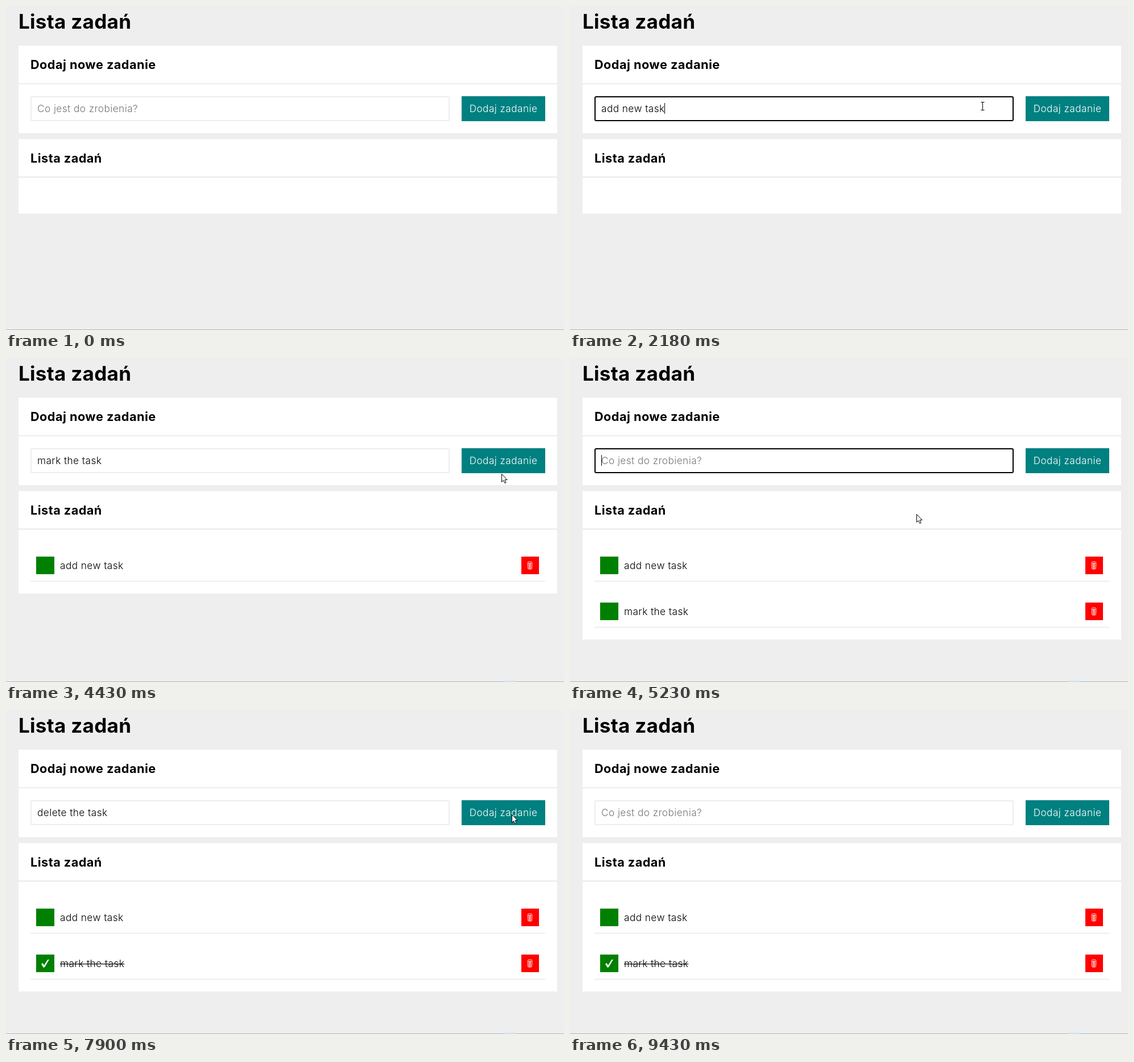
Recreate the animation shown at these times as an HTML page with a canvas. Size 981 by 571 pixels, loop 9.96 s.

```html
<!DOCTYPE html>
<html lang="pl">
<head>
<meta charset="utf-8">
<title>Lista zadań</title>
<style>
  html, body { margin: 0; width: 100%; height: 100%; overflow: hidden; background: #eee; }
  canvas { display: block; width: 981px; height: 571px; }
</style>
</head>
<body>
<canvas id="stage" width="981" height="571"></canvas>
<script>
const ctx = document.getElementById('stage').getContext('2d');
const LOOP = 9960;
const FAMILY = 'Inter, "Open Sans", sans-serif';
const STYLES = {
  title: { font: `700 35px ${FAMILY}`, spacing: '0.3px' },
  head: { font: `700 21.6px ${FAMILY}`, spacing: '0.5px' },
  body: { font: `300 17.2px ${FAMILY}`, spacing: '0.45px' }
};
const ROW = 81;
const FIRST_FOCUS = 950, CHECKED = 5890, REMOVED = 9230;

// Each round begins when the previous task is added
const ROUNDS = [
  { task: 'add new task', typed: 1720, blur: 2780, add: 2840 },
  { task: 'mark the task', typed: 3640, blur: 3840, add: 4830 },
  { task: 'delete the task', typed: 7290, blur: 5820, add: 8030 },
  { task: '', typed: Infinity, blur: 9100, add: Infinity }
];

// Pointer glides: start, end, from, to; it rests at the end until the next one
const FIELD = [725, 176], BUTTON = [843, 192], CHECK = [64, 454], TRASH = [916, 528];
const LOW = [793, 525], ADD = [871, 204], PRESS = [889, 184];
const GLIDES = [
  [120, 990, [925, 449], FIELD],
  [2180, 2450, FIELD, BUTTON],
  [3110, 3310, BUTTON, LOW],
  [3310, 3640, LOW, [872, 575]],
  [3840, 4430, [882, 575], ADD],
  [4430, 4600, ADD, [868, 190]],
  [5030, 5560, [868, 190], CHECK],
  [6090, 6220, CHECK, [290, 632]],
  [7700, 7900, [947, 575], PRESS],
  [8170, 8770, PRESS, TRASH],
  [9370, 9430, TRASH, [985, 575]]
];

function rect(x, y, w, h, color) {
  ctx.fillStyle = color;
  ctx.fillRect(x, y, w, h);
}

function text(str, x, y, style, color = '#000', align = 'left') {
  ctx.font = STYLES[style].font;
  ctx.letterSpacing = STYLES[style].spacing;
  ctx.textAlign = align;
  ctx.fillStyle = color;
  ctx.fillText(str, x, y);
  return ctx.measureText(str).width;
}

function fillPolygon(points) {
  ctx.beginPath();
  points.forEach(([x, y]) => ctx.lineTo(x, y));
  ctx.closePath();
  ctx.fillStyle = '#fff';
  ctx.fill();
}

function at(x, y, paint) {
  ctx.save();
  ctx.translate(x, y);
  ctx.lineWidth = 1;
  paint();
  ctx.restore();
}

function card(y, heading, bottom) {
  rect(22, y, 947, bottom - y, '#fff');
  rect(22, y + 65.7, 947, 2.5, '#eee');
  text(heading, 43, y + 41, 'head');
}

function input(value, focus, caretAge) {
  ctx.lineWidth = 2;
  ctx.strokeStyle = focus ? '#000' : '#eee';
  ctx.beginPath();
  ctx.roundRect(44, 160, 735, 42, focus ? 2 : 0);
  ctx.stroke();
  const width = text(value || 'Co jest do zrobienia?', 55, 187, 'body', value ? '#000' : '#757575');
  const lit = Math.floor(caretAge / 500) % 2 === 0;
  if (focus && lit) rect(Math.floor(55 + (value ? width : 0)), 171, 1, 19, '#000');
}

function trash() {
  ctx.strokeStyle = '#ffe4dc';
  ctx.beginPath();
  ctx.ellipse(0, -5, 4, 1.6, 0, 0, Math.PI * 2);
  for (const x of [-4, -1.5, 0, 1.5, 4]) {
    ctx.moveTo(x, -4);
    ctx.lineTo(x * 0.8, 6);
  }
  ctx.moveTo(-3.2, 6);
  ctx.quadraticCurveTo(0, 7.6, 3.2, 6);
  ctx.stroke();
}

function task(i, done) {
  const y = 350 + i * ROW;
  rect(53, y, 32, 31, 'green');
  rect(906, y, 31, 31, 'red');
  at(921, y + 15.5, trash);
  rect(43, y + 42.5, 905, 2, '#eee');
  const width = text(ROUNDS[i].task, 95, y + 22, 'body');
  if (!done) return;
  rect(95, y + 16, width, 1.2, '#000');
  at(62, y + 8.5, () =>
    fillPolygon([[0, 8], [2.6, 6.4], [5, 10.2], [11, 0.8], [14, 0], [6.2, 13.6], [3.8, 14.6]]));
}

function pointerAt(t) {
  const glide = GLIDES.findLast(g => g[0] <= t);
  if (!glide) return null;
  const [start, end, from, to] = glide;
  const k = Math.min(1, (t - start) / (end - start));
  const ease = k * k * (3 - 2 * k);
  return from.map((v, i) => Math.round(v + (to[i] - v) * ease));
}

function arrow() {
  ctx.strokeStyle = '#000';
  fillPolygon([[0, 0], [0, 14], [3, 11], [5.4, 16], [7.6, 15], [5.4, 10.2], [9.6, 10]]);
  ctx.stroke();
}

function beam() {
  ctx.strokeStyle = '#000';
  ctx.beginPath();
  for (const y of [-7, 7]) {
    ctx.moveTo(-3, y);
    ctx.lineTo(3, y);
  }
  ctx.moveTo(0, -7);
  ctx.lineTo(0, 7);
  ctx.stroke();
}

function draw(t) {
  const round = ROUNDS.findIndex(r => t < r.add);
  const { task: name, typed, blur } = ROUNDS[round];
  const focusStart = round ? ROUNDS[round - 1].add : FIRST_FOCUS;
  const isTyped = t >= typed;
  const count = round - (t >= REMOVED ? 1 : 0);

  rect(0, 0, 981, 571, '#eee');
  text('Lista zadań', 22, 40, 'title');
  card(70, 'Dodaj nowe zadanie', 224);
  input(isTyped ? name : '', t >= focusStart && t < blur, t - (isTyped ? typed : focusStart));
  rect(801, 159, 147, 44, 'teal');
  text('Dodaj zadanie', 874.5, 187, 'body', '#fff', 'center');

  card(234.5, 'Lista zadań', count ? 334 + count * ROW : 366);
  for (let i = 0; i < count; i++) task(i, i === 1 && t >= CHECKED);

  rect(0, 570, 981, 1, '#b4b4b4');
  if (t >= ROUNDS[1].blur) rect(876, 569, 20, 2, '#c6e2ef');

  const spot = pointerAt(t);
  if (!spot) return;
  const [x, y] = spot;
  const overField = x > 43 && x < 780 && y > 159 && y < 203;
  at(x + 0.5, y + 0.5, overField ? beam : arrow);
}

const start = performance.now();
function tick() {
  draw((performance.now() - start) % LOOP);
  requestAnimationFrame(tick);
}
tick();
</script>
</body>
</html>
```
